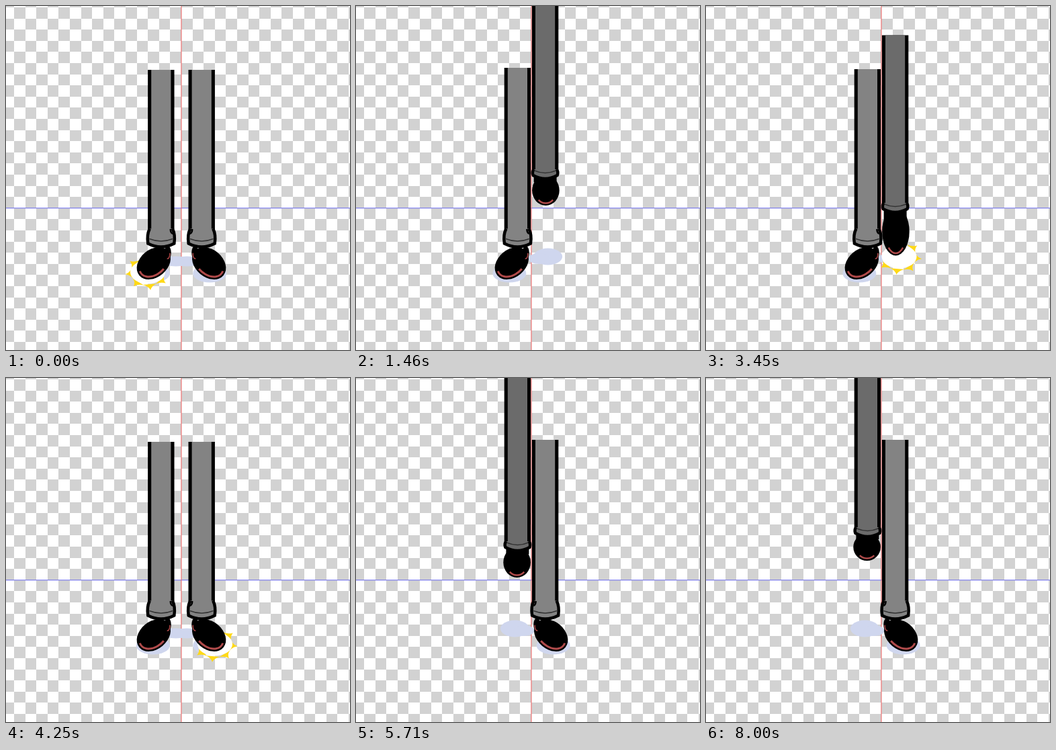
Write an HTML page with a canvas that moves like this. It is 512x512 px and loops after 8500 ms.

```html
<!DOCTYPE html>
<html lang="en">
<head>
<meta charset="utf-8">
<title>Stomping legs</title>
<style>
  html, body { margin: 0; width: 100%; height: 100%; overflow: hidden; background: #fff; }
  canvas { display: block; width: 512px; height: 512px; }
</style>
</head>
<body>
<canvas id="stage" width="512" height="512"></canvas>
<script>
const ctx = document.getElementById('stage').getContext('2d');
const LOOP = 8500, HALF = LOOP / 2, STEP = 100;
const AXIS_X = 261, AXIS_Y = 300.8, CELL = 16.6;
const WIDE = 30.2, NARROW = 20.6;   // distance of a leg from the axis
const FRONT_GRAY = '#838383', BACK_GRAY = '#6b6b6b';
const RED = '#b04a4a', SHADOW = '#cfd6ee', YELLOW = '#ffd916';

const lerp = (a, b, k) => a + (b - a) * k;
const rad = degrees => degrees * Math.PI / 180;

// Eased progress that advances once per STEP and then holds at 1.
function progress(t, start, count) {
  const i = Math.min(Math.floor((t - start) / STEP), count);
  return Math.sin(Math.PI / 2 * i / count);
}

function rect(x, y, w, h, color) {
  ctx.fillStyle = color;
  ctx.fillRect(x, y, w, h);
}

function ellipse(x, y, rx, ry, color, turn = 0) {
  ctx.beginPath();
  ctx.ellipse(x, y, rx, ry, turn, 0, 2 * Math.PI);
  ctx.fillStyle = color;
  ctx.fill();
}

function stroke(color, width) {
  ctx.strokeStyle = color;
  ctx.lineWidth = width;
  ctx.stroke();
}

function arc(x, y, rx, ry, turn, from, to, color, width) {
  ctx.beginPath();
  ctx.ellipse(x, y, rx, ry, turn, rad(from), rad(to));
  stroke(color, width);
}

// Draws with +x pointing outward; side is 1 for the right leg, -1 for the left.
function onSide(side, x, y, draw) {
  ctx.save();
  ctx.translate(AXIS_X + side * x, y);
  ctx.scale(side, 1);
  draw();
  ctx.restore();
}

function drawBackground() {
  rect(0, 0, 512, 512, '#fff');
  const edge = (axis, i) => Math.round(axis + i * CELL);
  for (let row = -19; row < 13; row++) {
    for (let col = -16; col < 16; col++) {
      if ((row + col) % 2 === 0) continue;
      const x = edge(AXIS_X, col), y = edge(AXIS_Y, row);
      rect(x, y, edge(AXIS_X, col + 1) - x, edge(AXIS_Y, row + 1) - y, '#d2d2d2');
    }
  }
  rect(0, AXIS_Y - 0.5, 512, 1, '#6868ee');
  rect(AXIS_X - 0.6, 0, 1.1, 512, '#ee6868');
}

function drawTrouser(top, bottom, flare, height, color) {
  const y = bottom - height, low = bottom - 5;
  rect(-19.7, top, 39.4, y - top + 1, '#000');
  ctx.beginPath();
  ctx.moveTo(-17, y);
  ctx.quadraticCurveTo(-flare - 2, y + height / 3, -flare, low);
  ctx.quadraticCurveTo(0, bottom + 5, flare, low);
  ctx.quadraticCurveTo(flare + 2, y + height / 3, 17, y);
  ctx.fillStyle = color;
  ctx.fill();
  stroke('#000', 4.5);
  rect(-14.6, top, 29.2, y - top + 3, color);

  ctx.beginPath();
  ctx.moveTo(-flare + 2, low - 7);
  ctx.quadraticCurveTo(0, low, flare - 2, low - 7);
  stroke('#333', 1.4);
}

function drawFrontLeg(side, { x, dy = 0, tilt = 0, top = 95 }) {
  onSide(side, x, dy, () => {
    const shoeX = lerp(11, 16, tilt) - (WIDE - x) * 0.25 * (1 - tilt);
    const shoeY = lerp(383, 373, tilt);
    const rx = lerp(28, 34, tilt), ry = lerp(20.5, 14, tilt);
    const turn = rad(lerp(40, 12, tilt));
    ellipse(shoeX, shoeY, rx, ry, '#000', turn);
    ellipse(shoeX - 21, 367, 5, 10, '#000');
    arc(shoeX, shoeY, rx - 4, ry - 4, turn, lerp(-15, 10, tilt), 105, RED, lerp(3, 5, tilt));
    if (tilt < 0.5) arc(shoeX - 21, 369, 3, 7, 0, 70, 190, RED, 1.5);
    drawTrouser(top, 358.5, 19.5, 27, FRONT_GRAY);
    arc(-18, 332, 4, 7, 0, 0, 80, '#000', 2.5);
  });
}

function drawBackLeg(side, { x, hem, toe }) {
  onSide(side, x, 0, () => {
    const length = toe - hem, y = lerp(hem, toe, 0.45), ry = length * 0.55;
    rect(-17, hem - 6, 34, length * 0.3, '#000');
    ellipse(0.8, y, 20.3, ry, '#000');
    arc(0.8, y, 16, ry - 3.5, 0, 48, 132, RED, 2.4);
    drawTrouser(hem - 262.5, hem + 1, 18, 14, BACK_GRAY);
  });
}

function drawFrontShadow(side, x, heel) {
  onSide(side, x, 0, () => {
    ellipse(12, 398, 25, 13.5, SHADOW);
    if (heel) ellipse(-22, 380, 20, 7.5, SHADOW);
  });
}

function drawBackShadow(side) {
  onSide(side, NARROW, 0, () => {
    ellipse(4, 373, 21.5, 12.5, SHADOW);
    ellipse(-9, 376, 16, 8, SHADOW);
  });
}

function drawFlash(side, x, y) {
  onSide(side, x, y, () => {
    const point = (degrees, size) =>
      [34 * size * Math.cos(rad(degrees)), 27 * size * Math.sin(rad(degrees))];
    ctx.fillStyle = YELLOW;
    for (let angle = -38; angle < 180; angle += 45) {
      const tip = point(angle, 1);
      ctx.beginPath();
      ctx.moveTo(...point(angle - 24, 0.74));
      ctx.quadraticCurveTo(...point(angle - 5, 0.78), ...tip);
      ctx.quadraticCurveTo(...point(angle + 5, 0.78), ...point(angle + 24, 0.74));
      ctx.fill();
    }
    ellipse(0, 0, 26, 17.5, '#fff');
  });
}

// Pose within one half: "lead" stays planted while "free" does the stomping.
function poseAt(t) {
  if (t < 1060) {
    const k = progress(t, 0, 3);
    return {
      lead: { x: WIDE },
      free: { x: WIDE, dy: -79 * k, tilt: k },
      flash: k === 0 && { lead: true, x: 50, y: 396 }
    };
  }
  if (t < 2650) {
    const k = progress(t, 1060, 4);
    return {
      lead: { x: lerp(28.4, NARROW, k), tilt: 1 - k, top: lerp(95, 92, k) },
      free: k === 0 ? { x: WIDE }
        : { x: lerp(WIDE, NARROW, k), hem: lerp(358, 256, k), toe: lerp(406, 297, k) },
      back: k > 0,
      flash: k === 0 && { x: 50, y: 396 }
    };
  }
  const k = progress(t, t < 3450 ? 2650 : 3450, 3);
  return {
    lead: { x: NARROW, top: lerp(94, 92, k) },
    free: { x: NARROW, hem: lerp(306, 235, k), toe: lerp(371.5, 272, k) },
    back: true,
    flash: k === 0 && { x: 26.5, y: 373 }
  };
}

function render(time) {
  const t = time % LOOP;
  const free = t < HALF ? 1 : -1, lead = -free;
  const pose = poseAt(t % HALF);

  drawBackground();
  drawFrontShadow(lead, pose.lead.x, !pose.back);
  if (pose.back) drawBackShadow(free);
  else drawFrontShadow(free, pose.free.x, true);
  if (pose.flash) drawFlash(pose.flash.lead ? lead : free, pose.flash.x, pose.flash.y);

  if (pose.back) drawBackLeg(free, pose.free);
  else drawFrontLeg(free, pose.free);
  drawFrontLeg(lead, pose.lead);
}

const begin = performance.now();
function tick() {
  render(performance.now() - begin);
  requestAnimationFrame(tick);
}
tick();
</script>
</body>
</html>
```
